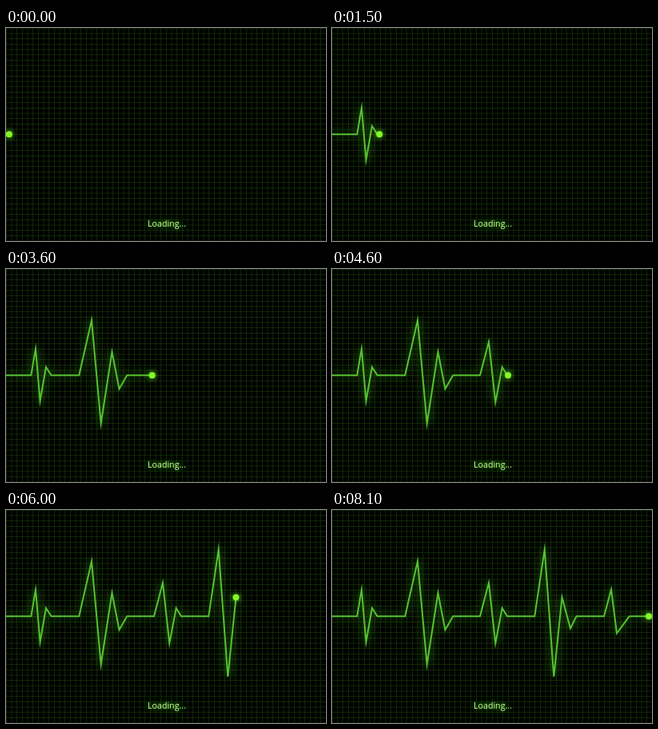
An HTML page with a canvas for the animation above (8800 ms loop, 400 by 267 pixels).

```html
<!DOCTYPE html>
<html lang="en">
<head>
<meta charset="utf-8">
<title>Heartbeat loader</title>
<style>
html, body { margin: 0; width: 100%; height: 100%; overflow: hidden; background: #000; }
canvas { display: block; }
p {
  position: absolute; left: 1px; top: 237px; width: 400px; margin: 0;
  font: 500 10.667px/16px "Open Sans", sans-serif; text-align: center;
  color: #c9ff9d; text-shadow: 0 0 5px #3a9a12, 0 0 13px #3a9a12;
}
</style>
</head>
<body>
<canvas id="screen" width="400" height="267"></canvas>
<p>Loading...</p>
<script>
const W = 400, H = 267, CELL = 20 / 3, BASE = 133.3, LOOP = 8800;
const ctx = document.getElementById('screen').getContext('2d');

// Each point: x, y, and the dot's x where it rests beside the corner.
const flat = (x, dotX = x) => [x, BASE, dotX];
const points = [
  flat(4), flat(31.3, 31),
  [37, 100], [42.6, 165.5], [50, 123], flat(56.7, 59.3),
  flat(91.3, 90),
  [107, 64.3], [118.7, 193.5], [132.5, 104], [141.5, 150.3], flat(151.3, 152),
  flat(185, 182.7),
  [196, 91.3], [204.3, 167], [212.7, 123], flat(219, 220),
  flat(253.3, 251),
  [265.7, 49.5], [277.3, 209], [287.5, 109.5], [298, 148.5], flat(305.5, 306),
  flat(340, 339),
  [349, 99.7], [356, 154.5], flat(371.7),
  flat(401, 396)
];

// Rests on the baseline alternate between 500 and 700 ms; a beat moves every 100 ms.
let rests = 0;
const holds = points.map(([, y]) => y !== BASE ? 100 : rests++ % 2 ? 700 : 500);

function drawGrid() {
  ctx.fillStyle = '#000';
  ctx.fillRect(0, 0, W, H);
  ctx.fillStyle = '#173a09';
  for (let x = 0; x < W; x += CELL) ctx.fillRect(x, 0, 2 / 3, H);
  for (let y = 0; y < H; y += CELL) ctx.fillRect(0, y, W, 2 / 3);
}

function glow(color, blur) {
  ctx.shadowColor = color;
  ctx.shadowBlur = blur;
}

function drawTrace(last) {
  ctx.beginPath();
  ctx.moveTo(-5, BASE);
  for (const [x, y] of points.slice(0, last + 1)) ctx.lineTo(x, y);
  ctx.lineWidth = 2;
  ctx.miterLimit = 10;
  ctx.strokeStyle = '#56c232';
  glow('#3fa51c', 13);
  ctx.stroke();
}

function drawDot([x, y, dotX = x]) {
  ctx.beginPath();
  ctx.arc(dotX, y, 4, 0, 2 * Math.PI);
  ctx.fillStyle = '#80fa28';
  glow('#66e61c', 7);
  ctx.fill();
}

function frame() {
  let time = performance.now() % LOOP, i = 0;
  while (i < points.length - 1 && time >= holds[i]) time -= holds[i++];
  glow('transparent', 0);
  drawGrid();
  drawTrace(i);
  drawDot(points[i]);
  requestAnimationFrame(frame);
}
frame();
</script>
</body>
</html>
```
